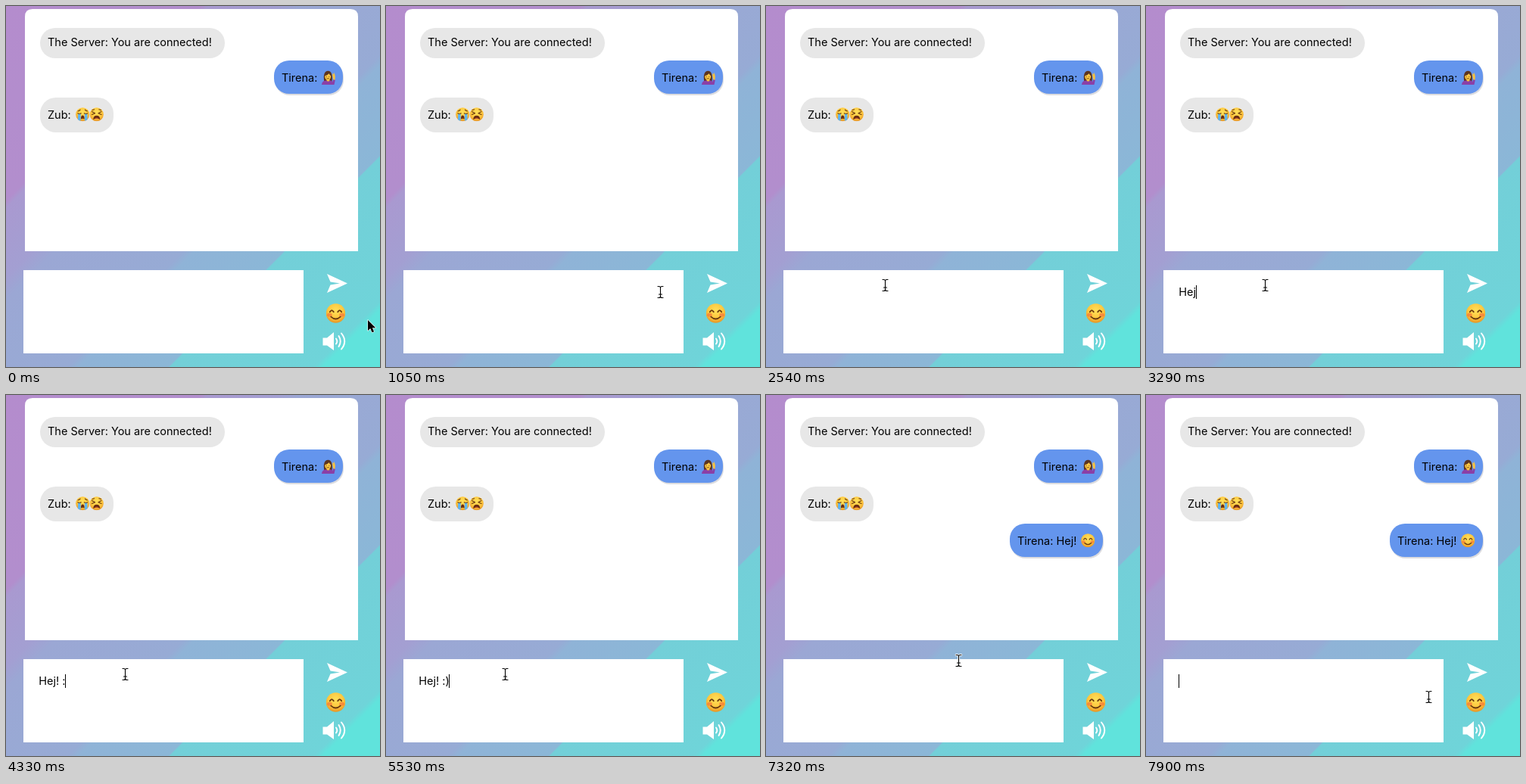
Recreate the animation shown at these times as an HTML page. Size 494 px wide and 477 px high, loop 8000 ms.

```html
<!DOCTYPE html>
<html lang="en">
<head>
<meta charset="utf-8">
<title>Chat</title>
<style>
  html, body { margin: 0; width: 100%; height: 100%; overflow: hidden; }
  svg.stage { display: block; width: 100vw; height: 100vh; }
  text { font: 14.5px Inter, "Open Sans", sans-serif; fill: #000; white-space: pre; }
  .theirs { fill: #e7e7e7; }
  .mine { fill: #6495ed; }
  .shade { fill: #dcdcdf; }
  .line { fill: none; stroke-linecap: round; stroke-linejoin: round; }
</style>
</head>
<body>
<svg class="stage" viewBox="0 0 494 477" preserveAspectRatio="none">
  <defs>
    <linearGradient id="sky" gradientUnits="userSpaceOnUse" x1="0" y1="0" x2="485.5" y2="485.5">
      <stop offset="0" stop-color="#b48ccd"/>
      <stop offset=".265" stop-color="#b28ecd"/>
      <stop offset=".275" stop-color="#a999d0"/>
      <stop offset=".37" stop-color="#a39fd2"/>
      <stop offset=".4" stop-color="#9ba7d4"/>
      <stop offset=".575" stop-color="#97abd5"/>
      <stop offset=".59" stop-color="#8fb3d7"/>
      <stop offset=".712" stop-color="#8bb7d7"/>
      <stop offset=".714" stop-color="#73cfd8"/>
      <stop offset=".91" stop-color="#6fd4d9"/>
      <stop offset=".922" stop-color="#60e3dc"/>
      <stop offset="1" stop-color="#60e3dc"/>
    </linearGradient>
    <radialGradient id="skin" cx=".5" cy=".35" r=".68">
      <stop offset="0" stop-color="#ffe05a"/>
      <stop offset=".6" stop-color="#fdc63d"/>
      <stop offset="1" stop-color="#e58f22"/>
    </radialGradient>

    <!-- emoji fit a box of 20 units around the origin -->
    <symbol id="smile" viewBox="-10 -10 20 20">
      <circle r="9.8" fill="url(#skin)"/>
      <ellipse cx="-6.2" cy="1.8" rx="2.6" ry="1.9" fill="#f4703c" opacity=".65"/>
      <ellipse cx="6.2" cy="1.8" rx="2.6" ry="1.9" fill="#f4703c" opacity=".65"/>
      <path class="line" stroke="#6a3a10" stroke-width="1.4" d="M-5.9-1.4Q-4-4.6-2.1-1.4M2.1-1.4Q4-4.6 5.9-1.4M-4.8 3.6Q0 8 4.8 3.6"/>
    </symbol>
    <symbol id="sob" viewBox="-10 -10 20 20">
      <circle r="9.8" fill="url(#skin)"/>
      <path class="line" stroke="#6a3a10" stroke-width="1.2" d="M-6.8-4.6Q-4.6-5-3.4-6.6M6.8-4.6Q4.6-5 3.4-6.6M-7-1.6Q-4.6 0-2.2-1.6M7-1.6Q4.6 0 2.2-1.6"/>
      <path fill="#5fb4ee" d="M-6.6-.6H-2.8V8.6Q-5 9.6-6.8 7.4ZM6.6-.6H2.8V8.6Q5 9.6 6.8 7.4Z"/>
      <path fill="#6a2f12" d="M-2.5 6.6Q-2.6 1.4 0 1.4T2.5 6.6Q0 5.4-2.5 6.6Z"/>
    </symbol>
    <symbol id="tired" viewBox="-10 -10 20 20">
      <circle r="9.8" fill="url(#skin)"/>
      <path class="line" stroke="#6a3a10" stroke-width="1.3" d="M-6.8-4L-2.4-1.7-6.8.2M6.8-4L2.4-1.7 6.8.2M-6.2-6.2L-3.4-7M6.2-6.2L3.4-7"/>
      <path fill="#6a2f12" d="M-5 7.2Q-4.6 1.6 0 1.6T5 7.2Q0 4.8-5 7.2Z"/>
      <path fill="#f0574f" d="M-2.5 6.1Q0 3.6 2.5 6.1Q0 5.4-2.5 6.1Z"/>
    </symbol>
    <symbol id="hand" viewBox="-10 -10 20 20">
      <path fill="#5b3420" d="M-5.4 6Q-8-8.6 0-9.2Q7-8.6 5.2 6Z"/>
      <path fill="#8b3fa6" d="M-9 10Q-8.4 4.4-2.4 4H2.4Q5 4 6.2 6L7.4 2.4 9.8 3.4 8.4 10Z"/>
      <path fill="#fcc33c" d="M-2 2H2V4.4Q0 6.2-2 4.4Z"/>
      <ellipse cx="-.4" cy="-1.6" rx="4.2" ry="5.2" fill="#fdca45"/>
      <path fill="#5b3420" d="M-4.8-2Q-4.6-7.4 0-7.6Q4-7.2 4.2-2Q2.4-3 1.2-5.6Q-1-3-4.8-2Z"/>
      <path fill="#fcc33c" d="M7.2 3L6-3.4 6.6-6 7.6-4.2 8-7 9.2-4.2 9.8-1.4 9.4 3.4Z"/>
      <path class="line" stroke="#6a3a10" stroke-width=".9" d="M-2.4-1.4V-1M1.4-1.4V-1M-1.9 1.2Q-.4 2.4 1.2 1.2"/>
    </symbol>
  </defs>

  <rect width="494" height="477" fill="url(#sky)"/>
  <path fill="#fff" d="M25 324V14Q25 4 35 4H455Q465 4 465 14V324Z"/>
  <rect x="23" y="349" width="370" height="110" fill="#fff"/>

  <rect class="theirs" x="45" y="29" width="244" height="40" rx="20"/>
  <text x="55" y="53">The Server: You are connected!</text>

  <rect class="shade" x="355" y="74" width="91" height="44" rx="20"/>
  <rect class="mine" x="354" y="72" width="91" height="44" rx="20"/>
  <text x="364" y="100">Tirena:</text>
  <use href="#hand" x="416" y="85" width="19" height="19"/>

  <rect class="theirs" x="45" y="121" width="97" height="46" rx="21"/>
  <text x="55" y="149">Zub:</text>
  <use href="#sob" x="92" y="134" width="18.5" height="18.5"/>
  <use href="#tired" x="110.5" y="134" width="18.5" height="18.5"/>

  <g id="reply" visibility="hidden">
    <rect class="shade" x="323" y="172" width="123" height="44" rx="20"/>
    <rect class="mine" x="322" y="170" width="123" height="44" rx="20"/>
    <text x="332" y="198">Tirena: Hej!</text>
    <use href="#smile" x="416" y="183" width="18.5" height="18.5"/>
  </g>

  <!-- side buttons -->
  <path fill="#fff" d="M424 354L451 366.5 424 379 428.5 368.6 441 366.5 428.5 364.4Z"/>
  <use href="#smile" x="422.5" y="393" width="26" height="26"/>
  <path fill="#fff" d="M418.5 438.5H424L433 431V455L424 448.5H418.5Z"/>
  <path class="line" stroke="#fff" stroke-width="1.9" d="M436 439.5Q438.6 443 436 446.5M439.5 436Q444 443 439.5 450M443 432.5Q451.5 443 443 453.5"/>

  <text id="draft" x="43.3" y="383" xml:space="preserve"></text>
  <rect id="caret" y="369" width="1" height="18" visibility="hidden"/>

  <g id="arrow">
    <path d="M0 0V14L3.2 11.1 5.5 16.3 8.1 15.2 5.9 10.2H10.2Z" stroke="#fff" stroke-width="1.2" stroke-linejoin="round" paint-order="stroke"/>
  </g>
  <g id="beam" visibility="hidden" class="line">
    <path id="beamShape" stroke="#fff" stroke-width="2.4" d="M-3.5-7.5H-2Q0-7.5 0-5.5V5.5Q0 7.5-2 7.5H-3.5M3.5-7.5H2Q0-7.5 0-5.5M3.5 7.5H2Q0 7.5 0 5.5M-2 3H2"/>
    <use href="#beamShape" id="beamInk"/>
    <path stroke="#000" stroke-width="1.1" d="M-3.5-7.5H-2Q0-7.5 0-5.5V5.5Q0 7.5-2 7.5H-3.5M3.5-7.5H2Q0-7.5 0-5.5M3.5 7.5H2Q0 7.5 0 5.5M-2 3H2"/>
  </g>
</svg>
<script>
  const LOOP = 8000, SEND = 5670;
  const $ = id => document.getElementById(id);
  const draft = $('draft'), caret = $('caret');

  // each list holds [start time, value...]
  const pointer = [
    [0, 478, 415, 'arrow'], [900, 456, 407, 'arrow'], [1050, 362.5, 378, 'beam'],
    [1200, 287.5, 373, 'beam'], [1490, 190.5, 370, 'beam'], [1640, 157.5, 369, 'beam'],
    [7020, 176.5, 365, 'beam'], [7170, 222.5, 355, 'beam'], [7320, 254.5, 351, 'beam'],
    [7460, 298.5, 375, 'beam'], [7610, 339.5, 398, 'beam'], [7900, 373.5, 399, 'beam']
  ];
  const typing = [
    [0, ''], [2990, 'H'], [3140, 'He'], [3290, 'Hej'], [3740, 'Hej!'],
    [4030, 'Hej! '], [4330, 'Hej! :'], [4480, 'Hej! :)'], [SEND, '']
  ];
  const blink = [
    [0, false], [2090, true], [2540, false], [2990, true], [5080, false],
    [5530, true], [5970, false], [6570, true], [7020, false], [7610, true]
  ];

  const at = (list, t) => list.findLast(step => step[0] <= t).slice(1);
  const show = (el, on) => el.setAttribute('visibility', on ? 'visible' : 'hidden');

  function draw(t) {
    const [x, y, shape] = at(pointer, t);
    for (const id of ['arrow', 'beam']) {
      $(id).setAttribute('transform', `translate(${x} ${y})`);
      show($(id), id === shape);
    }
    const [words] = at(typing, t);
    if (draft.textContent !== words) draft.textContent = words;
    const width = words ? draft.getComputedTextLength() : 0;
    caret.setAttribute('x', 43 + Math.round(width));
    show(caret, at(blink, t)[0]);
    show($('reply'), t >= SEND);
  }

  const start = performance.now();
  function tick() {
    draw((performance.now() - start) % LOOP);
    requestAnimationFrame(tick);
  }
  tick();
</script>
</body>
</html>
```
